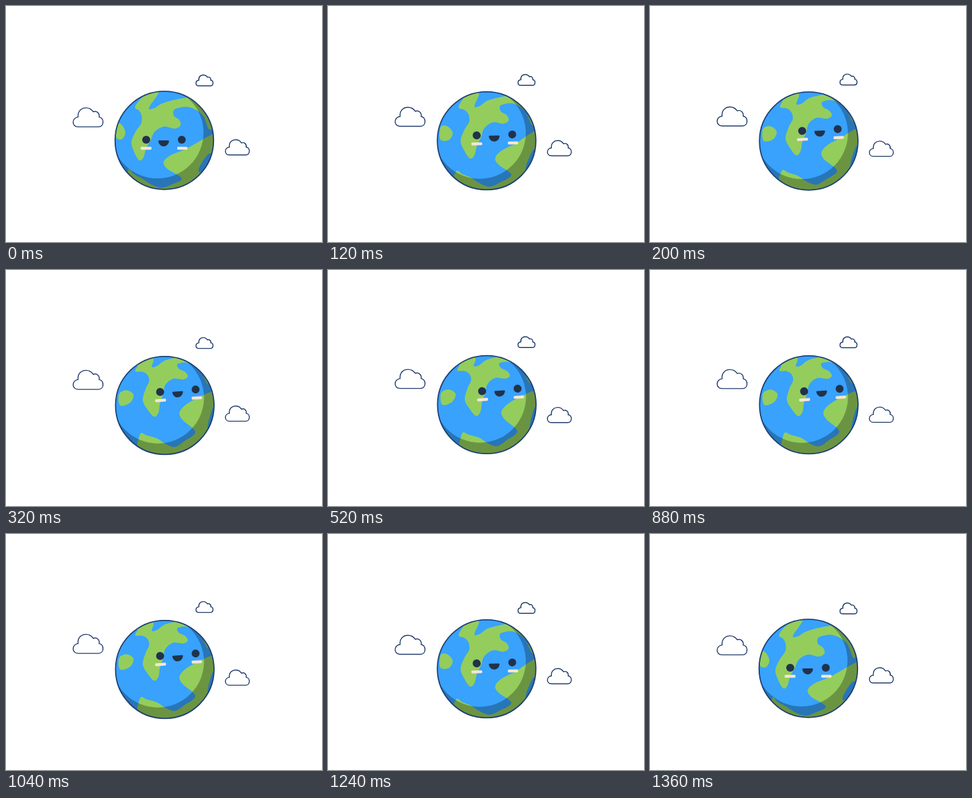
An HTML page for the animation above (1.4 s loop, 480 by 360 pixels).

```html
<!DOCTYPE html>
<html lang="en">
<head>
<meta charset="utf-8">
<title>Smiling globe</title>
<style>
  html, body { margin: 0; width: 100%; height: 100%; overflow: hidden; background: #fff; }
  svg { display: block; width: 480px; height: 360px; }
  .land { fill: #94cd5c; }
  .sea { fill: #38a2fd; }
  .ink { fill: #22324a; }
  .blush { fill: #f6e5d3; }
  .cloud { fill: #fff; stroke: #1d3768; stroke-width: 1.4; }
</style>
</head>
<body>
<svg viewBox="0 0 480 360">
  <defs>
    <clipPath id="disc"><circle cx="240.5" cy="205" r="75"/></clipPath>
    <path id="puff" vector-effect="non-scaling-stroke" d="M-15 0C-25 0-25-14-15-15C-16-25-9-29-3-29C3-29 6-26 8-23C13-25 18-21 17-15C25-14 25 0 16 0Z"/>
  </defs>
  <g id="globe">
    <g clip-path="url(#disc)">
      <circle class="sea" cx="240.5" cy="205" r="75"/>
      <path class="land" id="main"/>
      <path class="land" id="south"/>
      <path class="sea" id="bay"/>
      <path class="land" id="isle"/>
      <path class="land" id="shore"/>
      <path fill-opacity=".28" fill-rule="evenodd" d="M160 120H330V290H160ZM160 193a70 70 0 1 0 140 0a70 70 0 1 0-140 0Z"/>
    </g>
    <circle cx="240.5" cy="205" r="74.8" fill="none" stroke="#1d3f74" stroke-width="1.8"/>
    <g id="face">
      <rect class="blush" x="-35.5" y="8.8" width="16.6" height="4.4" rx="1.6"/>
      <rect class="blush" x="20" y="8.8" width="15.8" height="4.4" rx="1.6"/>
      <circle class="ink" cx="-27" cy="-2" r="6.1"/>
      <circle class="ink" cx="27" cy="-2" r="6"/>
      <path class="ink" d="M-7.5-1H6.5Q8-1 7.5 1C5.5 10.5-6.5 10.5-8.5 1Q-9-1-7.5-1Z"/>
    </g>
  </g>
  <use class="cloud" href="#puff" id="cloudL"/>
  <use class="cloud" href="#puff" id="cloudR"/>
  <use class="cloud" href="#puff" id="cloudS"/>
</svg>
<script>
const STEP = 40, LOOP = 1400, LAST = 17, TURN = 8;
const CX = 240.5, CY = 205, R = 75;
const $ = id => document.getElementById(id);

// Coast points as seen at step 3; those outside the disc lie behind the rim
const coasts = {
  main: '205 140 198 154 207 158 213 165 214 176 207 188 201 205 206 219 215 232 222 227 226 212 232 200 237 186 250 177 266 179 274 174 271 166 262 160 262 151 280 148 299 160 311 182 325 165 298 128 272 136 244 143 230 152 222 152 229 132 216 120',
  south: '194 252 204 256 218 262 232 271 246 275 260 269 278 257 258 241 254 230 265 219 285 209 315 190 330 200 307 272 240 300 188 285',
  bay: '313 218 303 236 300 247 304 248 322 235',
  isle: '171 184 181 183 189 193 183 204 170 203',
  shore: '168 226 172 238 178 249 163 250 158 232'
};

// x, base line, scale, drift per step
const clouds = {
  cloudL: [124.5, 184.4, 1, -0.29],
  cloudR: [351.3, 227.2, 0.8, 0.43],
  cloudS: [301.4, 121.8, 0.57, -0.27]
};

const spin = (a, b, angle) => {
  const c = Math.cos(angle), s = Math.sin(angle);
  return [a * c + b * s, b * c - a * s];
};

// Swap the rim's outside with the hidden half of the ball
const fold = r => (2 * R - r) / r;

function toBall(px, py) {
  let x = px - CX, y = py - CY;
  const r = Math.hypot(x, y), back = r > R;
  if (back) { x *= fold(r); y *= fold(r); }
  const z = Math.sqrt(Math.max(0, R * R - x * x - y * y));
  return [x, y, back ? -z : z];
}

function toScreen([x, y, z], { yaw, pitch, roll }) {
  [x, z] = spin(x, z, yaw);
  [z, y] = spin(z, y, pitch);
  [x, y] = spin(x, y, roll);
  const k = z < 0 ? fold(Math.hypot(x, y)) : 1;
  return [CX + x * k, CY + y * k];
}

for (const id in coasts) {
  const pairs = coasts[id].match(/\d+ \d+/g);
  coasts[id] = pairs.map(s => toBall(...s.split(' ').map(Number)));
}

// Closed smooth curve through the points
function curve(pts) {
  const n = pts.length, at = i => pts[(i + n) % n];
  const pull = (i, sign) => at(i).map((v, k) => v + sign * (at(i + 1)[k] - at(i - 1)[k]) / 6);
  return 'M' + pts[0] + pts.map((_, i) =>
    'C' + [pull(i, 1), pull(i + 1, -1), at(i + 1)].join(' ')).join('') + 'Z';
}

function place(id, x, y, rest = '') {
  $(id).setAttribute('transform', `translate(${x} ${y}) ${rest}`);
}

// Sideways turn eases out; the upward tilt lags behind it
function turn(p) {
  const side = 1 - (1 - Math.min(p / TURN, 1)) ** 2;
  return { side, up: side * side };
}
const base = turn(3);

function draw(ms) {
  const k = Math.floor((ms % LOOP) / STEP);
  const p = k === LAST + 1 ? LAST : Math.min(k, 2 * LAST - k);
  const { side, up } = turn(p);
  const angles = {
    yaw: 0.28 * (side - base.side),
    pitch: 0.27 * (up - base.up),
    roll: 0.18 * (up - base.up)
  };
  for (const id in coasts)
    $(id).setAttribute('d', curve(coasts[id].map(v => toScreen(v, angles))));
  place('face', 240 + 20.5 * side, 206 - 21.5 * up, `rotate(${-4 * up})`);
  for (const id in clouds) {
    const [x, y, size, drift] = clouds[id];
    place(id, x, y + drift * p, `scale(${size})`);
  }
  const bob = p < TURN ? 0.2 * p : 1.6 - 0.24 * (p - TURN);
  place('globe', 0.7 * side, bob);
}

function tick(ms) {
  draw(Math.max(0, ms));
  requestAnimationFrame(tick);
}
draw(0);
requestAnimationFrame(tick);
</script>
</body>
</html>
```
